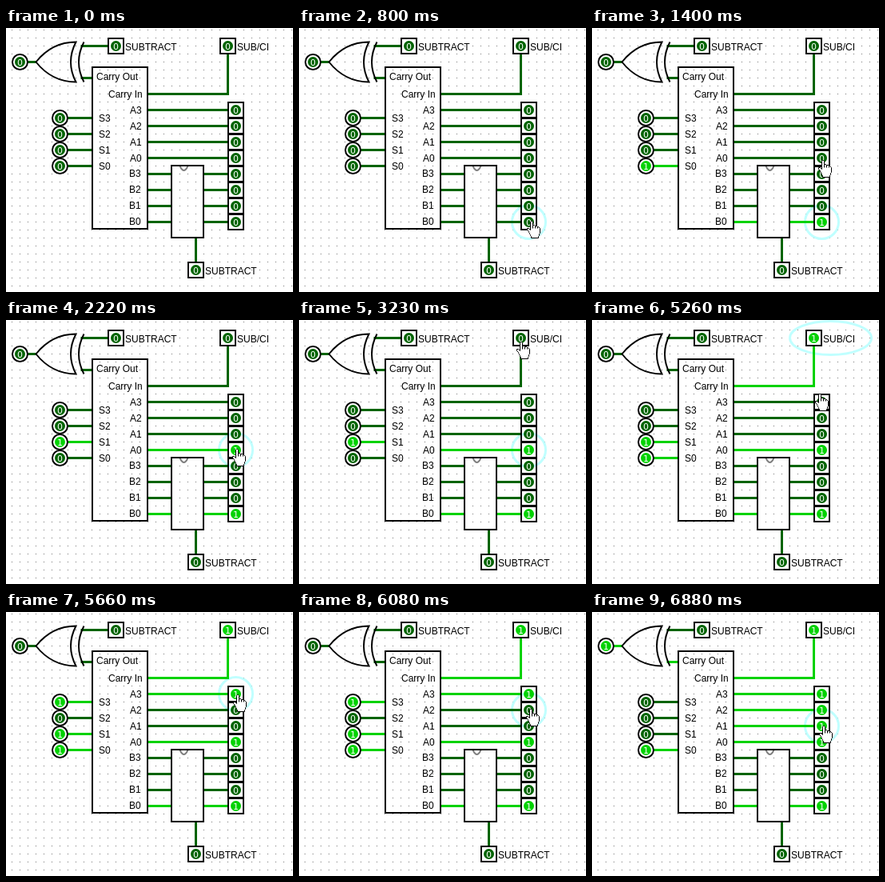
Recreate the animation shown at these times as an HTML page with a canvas. Size 359 px wide and 330 px high, loop 8 s.

```html
<!DOCTYPE html>
<html lang="en">
<head>
<meta charset="utf-8">
<title>4-bit adder</title>
<style>
html, body { margin: 0; width: 100%; height: 100%; overflow: hidden; background: #fff; }
canvas { display: block; }
</style>
</head>
<body>
<canvas id="stage" width="359" height="330"></canvas>
<script>
const ctx = document.getElementById('stage').getContext('2d');
const LOOP = 8000;
const LABEL = '12px "Liberation Sans", Arial, sans-serif';
const DIGIT = '11px "DejaVu Sans", sans-serif';

// Halos: centre x, centre y, horizontal radius
const HALO = { b0: [287, 242, 21], a0: [287, 162, 21], a1: [287, 142, 21],
  a2: [287, 122, 21], a3: [287, 102, 21], ci: [298, 22, 51] };

// Time, pointer x, pointer y, then any changed inputs
const STEPS = [
  [0, -50, -50, { halo: '', a: 0, b: 0, c: 0 }],
  [200, 307, 276], [380, 298, 249], [610, 285, 241],
  [800, 285, 241, { halo: 'b0' }],
  [1000, 287, 218, { b: 1 }],
  [1200, 287, 178], [1400, 283, 165], [1600, 283, 162], [1820, 283, 161],
  [2020, 283, 161, { halo: 'a0' }],
  [2220, 283, 161, { a: 1 }],
  [3030, 279, 140], [3230, 272, 27],
  [3430, 272, 20, { halo: 'ci' }],
  [3630, 272, 20, { c: 1 }],
  [5260, 279, 92], [5460, 284, 105],
  [5660, 284, 103, { halo: 'a3', a: 9 }],
  [5860, 284, 116],
  [6080, 284, 121, { halo: 'a2' }],
  [6280, 284, 130, { a: 13 }],
  [6480, 284, 142],
  [6880, 284, 142, { halo: 'a1', a: 15 }]
];

const gate = new Path2D('M37 42Q57 17 87 17Q74 42 87 67Q57 67 37 42Z M97 17Q84 42 97 67');
gate.curved = true;
const hand = new Path2D('M5 0H6L7 1V5H9L10 6H12L13 7H14L16 9V15L15 16V18L14 19V21H5V19' +
  'L4 18V17L3 16V15L2 14V13L0 11V9H2L4 11V1Z');
const fingers = new Path2D('M7 5V9M10 6V9M13 7V9');

const bit = (n, i) => n >> i & 1;
const level = on => on ? '#00d200' : '#006400';

function stateAt(t) {
  const s = {};
  for (const [start, x, y, change] of STEPS) {
    if (start > t) break;
    Object.assign(s, { x, y }, change);
  }
  return s;
}

function stroke(color, width, path) {
  ctx.strokeStyle = color;
  ctx.lineWidth = width;
  path ? ctx.stroke(path) : ctx.stroke();
}

function wire(on, ...pts) {
  ctx.beginPath();
  for (let i = 0; i < pts.length; i += 2) ctx.lineTo(pts[i], pts[i + 1]);
  stroke(level(on), 3);
}

function disc(x, y, r) {
  ctx.beginPath();
  ctx.arc(x, y, r, 0, 2 * Math.PI);
}

function text(str, x, y, font = LABEL, color = '#000', align = 'left') {
  ctx.font = font;
  ctx.fillStyle = color;
  ctx.textAlign = align;
  ctx.fillText(str, x - 0.5, y - 0.5);
}

function pin(on, x, y, round) {
  ctx.beginPath();
  if (round) disc(x, y, 9.5);
  else ctx.rect(x - 9.5, y - 9.5, 19, 19);
  stroke('#000', 2);
  disc(x, y, 6.5);
  ctx.fillStyle = level(on);
  ctx.fill();
  text(on, x + 0.5, y + 4.5, DIGIT, '#fff', 'center');
}

function box(x, y, w, h) {
  ctx.beginPath();
  ctx.rect(x - 0.5, y - 0.5, w, h);
  stroke('#000', 2);
}

function grid() {
  ctx.fillStyle = '#777';
  for (let x = 7; x < 359; x += 10)
    for (let y = 2; y < 330; y += 10) ctx.fillRect(x, y, 1, 1);
}

function wires(s, sum) {
  const carry = bit(sum, 4);
  wire(carry, 27, 42, 37, 42);
  wire(0, 93, 22, 127, 22);
  wire(carry, 93, 62, 107, 62);
  wire(s.c, 177, 82, 277, 82, 277, 32);
  wire(0, 237, 262, 237, 292);
  for (let i = 0; i < 4; i++) {
    const up = 20 * i;
    wire(bit(sum, i), 77, 172 - up, 107, 172 - up);
    wire(bit(s.a, i), 177, 162 - up, 277, 162 - up);
    wire(bit(s.b, i), 177, 242 - up, 207, 242 - up);
    wire(bit(s.b, i), 247, 242 - up, 277, 242 - up);
  }
}

function parts(s, sum) {
  stroke('#000', 2, gate);
  box(108, 49, 69, 202);
  ctx.beginPath();
  ctx.moveTo(217, 172);
  ctx.quadraticCurveTo(222, 183, 227, 172);
  stroke('#808080', 2);
  box(207, 172, 40, 90);

  pin(bit(sum, 4), 17, 42, true);
  pin(0, 137, 22);
  pin(s.c, 277, 22);
  pin(0, 237, 302);
  text('SUBTRACT', 149, 28);
  text('SUB/CI', 289, 28);
  text('SUBTRACT', 249, 308);
  text('Carry Out', 113, 65);
  text('Carry In', 128, 87);
  for (let i = 0; i < 4; i++) {
    const up = 20 * i;
    pin(bit(sum, i), 67, 172 - up, true);
    pin(bit(s.a, i), 287, 162 - up);
    pin(bit(s.b, i), 287, 242 - up);
    text('S' + i, 116, 177 - up);
    text('A' + i, 155, 167 - up);
    text('B' + i, 154, 246 - up);
  }
}

function pointer(x, y) {
  ctx.save();
  ctx.translate(x, y);
  ctx.fillStyle = '#fff';
  ctx.fill(hand);
  stroke('#000', 1, hand);
  stroke('#000', 1, fingers);
  ctx.restore();
}

function draw(t) {
  const s = stateAt(t), sum = s.a + s.b + s.c;
  ctx.fillStyle = '#fff';
  ctx.fillRect(0, 0, 359, 330);
  grid();
  ctx.save();
  ctx.translate(0.5, 0.5);
  if (s.halo) {
    const [x, y, r] = HALO[s.halo];
    ctx.beginPath();
    ctx.ellipse(x, y, r, 21, 0, 0, 2 * Math.PI);
    stroke('#c0ffff', 3);
  }
  wires(s, sum);
  parts(s, sum);
  pointer(s.x, s.y);
  ctx.restore();
}

const begin = performance.now();
function tick() {
  draw((performance.now() - begin) % LOOP);
  requestAnimationFrame(tick);
}
tick();
</script>
</body>
</html>
```
